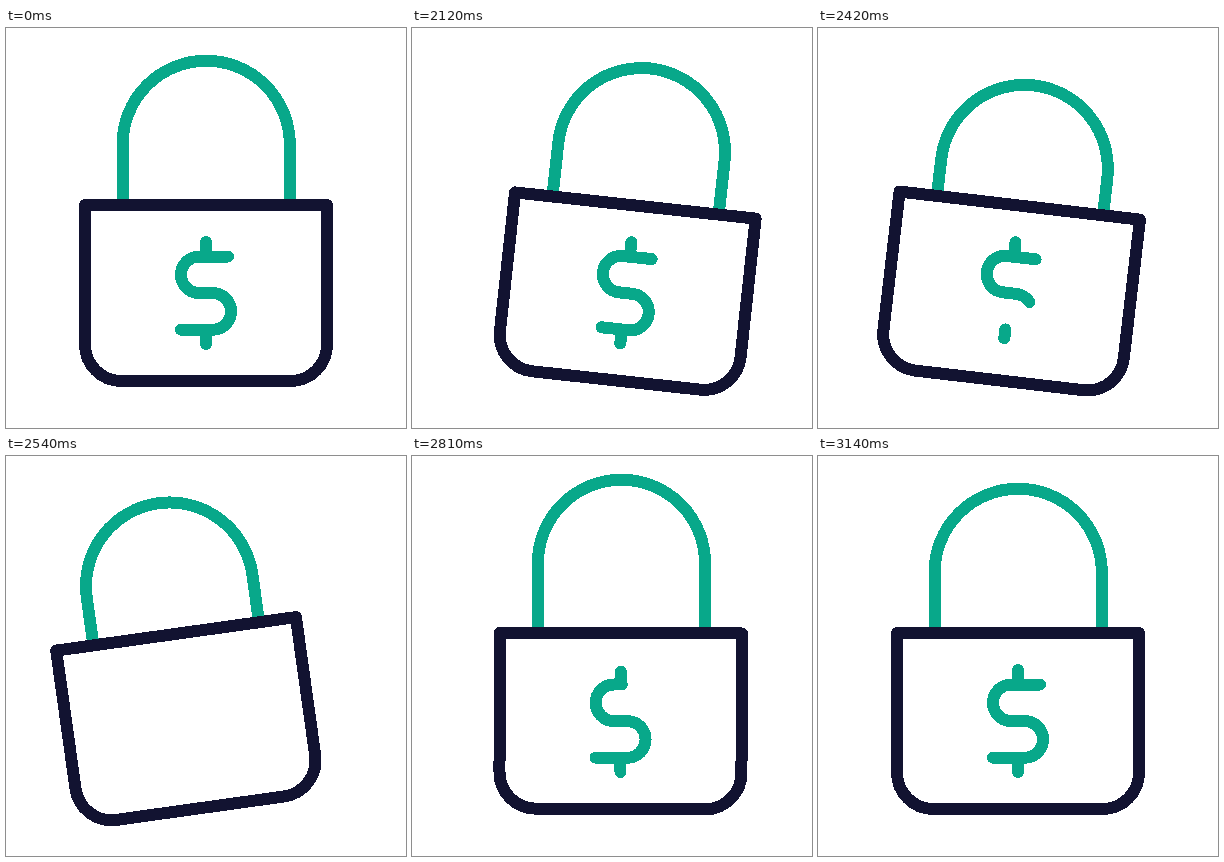
Animation of 400x400 px, one loop 3170 ms. Source, as an HTML page:

```html
<!DOCTYPE html>
<html lang="en">
<head>
<meta charset="utf-8">
<title>Swinging padlock</title>
<style>
  html, body { margin: 0; height: 100%; overflow: hidden; background: #fff; }
  svg { display: block; width: 100%; height: 100%; shape-rendering: crispEdges; }
  path { fill: none; stroke-width: 12; stroke-linecap: round; stroke-linejoin: round; }
  .green { stroke: #08a88a; }
  .navy { stroke: #121331; }
</style>
</head>
<body>
<svg viewBox="0 0 400 400">
  <clipPath id="above"><rect x="60" y="-40" width="280" height="217"/></clipPath>
  <g id="lock">
    <g clip-path="url(#above)">
      <path id="shackle" class="green" d="M116.6 200V116.3a83.6 83.6 0 0 1 167.2 0V200"/>
    </g>
    <path class="navy" d="M79 177H321V316.5a36.5 36.5 0 0 1-36.5 36.5H115.5a36.5 36.5 0 0 1-36.5-36.5Z"/>
    <g id="dollar" class="green">
      <path pathLength="1" d="M200 214V228.5"/>
      <path pathLength="1" d="M222 228.5H193.3a18.3 18.3 0 0 0 0 36.6H206.7a18.3 18.3 0 0 1 0 36.6H175"/>
      <path pathLength="1" d="M200 301.7V316"/>
    </g>
  </g>
</svg>
<script>
const LOOP = 3170, STEP = 30, PHASE = 20, END = 3110, BLANK = 2540;
const $ = id => document.getElementById(id);
const sine = u => (1 - Math.cos(Math.PI * u)) / 2;

// Swings from rest through [time, value] peaks and back to rest.
function swing(start, ...peaks) {
  const keys = [[start, 0], ...peaks, [END, 0]];
  return t => {
    const i = keys.findIndex(k => k[0] > t);
    if (i < 1) return 0;
    const [t0, a] = keys[i - 1], [t1, b] = keys[i];
    return a + (b - a) * sine((t - t0) / (t1 - t0));
  };
}

const shift = swing(1980, [2238, 24.4], [2508, -18.8], [2768, 9]);
const angle = swing(2000, [2280, 16], [2655, -14.5], [2876, 4]);
const lift = swing(2000, [2355, 25], [2800, -9]);

function draw(t) {
  $('lock').setAttribute('transform', `translate(${shift(t)}) rotate(${angle(t)} 200 265)`);
  $('shackle').setAttribute('transform', `translate(0 ${lift(t)})`);

  // The sign is wiped from its end, then drawn back from there.
  const len = Math.min(1, 1.016 * (1 - Math.exp(-Math.abs(t - BLANK) / 130)));
  const s = $('dollar').style;
  s.visibility = len ? 'visible' : 'hidden';
  s.strokeDasharray = len < 1 ? `${len} 3` : 'none';
  s.strokeDashoffset = t > BLANK ? len - 1 : 0;
}

const start = performance.now();
function frame() {
  const t = (performance.now() - start) % LOOP;
  draw(PHASE + STEP * Math.floor((t - PHASE) / STEP));
  requestAnimationFrame(frame);
}
frame();
</script>
</body>
</html>
```
